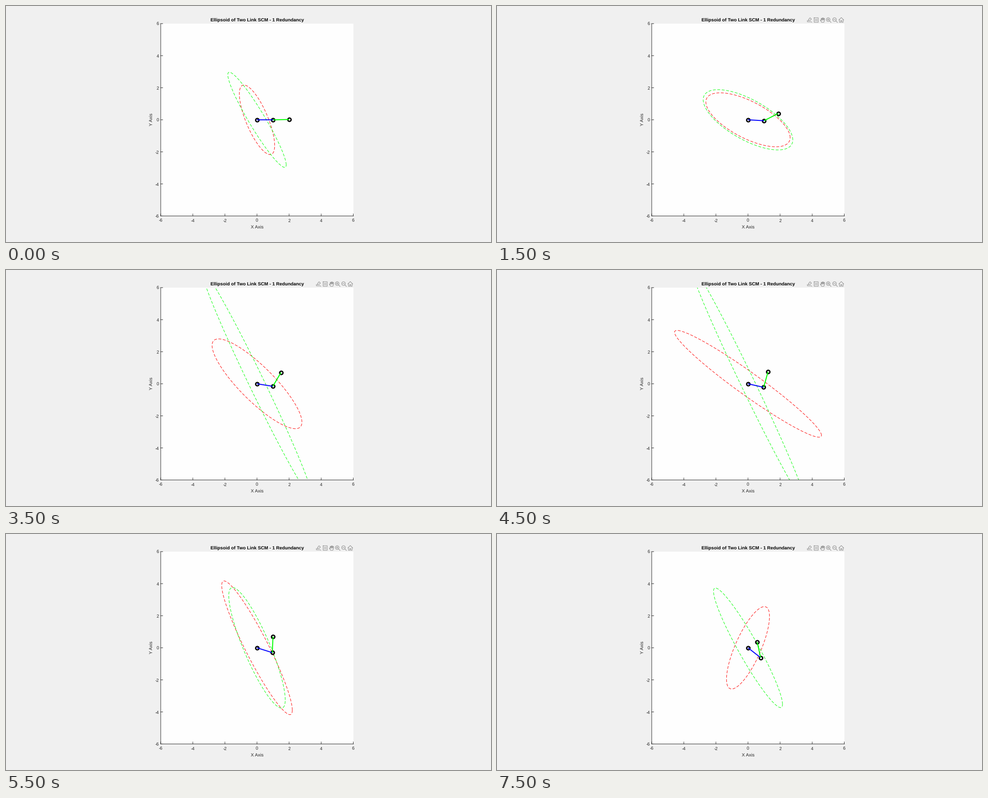
Recreate the animation shown at these times as a matplotlib script. Size 1072x522 px, loop 8 s.

```python
import numpy as np
import matplotlib
import matplotlib.pyplot as plt
from matplotlib.animation import FuncAnimation
from matplotlib.patches import Circle, Rectangle

matplotlib.rcParams["font.family"] = "Liberation Sans"
matplotlib.rcParams["text.hinting"] = "none"

W, H, DPI = 1072, 522, 100
PX = 72 / DPI                       # points per pixel
CX, CY, UNIT = 554.8, 251.7, 35.46  # plot origin and scale in pixels
LEFT, RIGHT, TOP, BOTTOM = 342, 768, 39, 464.4
INK, GREY, RED, GREEN, BLUE = "#262626", "#8c8c8c", "#ff0000", "#00ff00", "#0000ff"
FRAMES, STEP = 16, 500
TOOLBAR_FROM = 3

# Key step: (half width, half height, tilt) of the red, then the green ellipse
KEYS = {
    0: (1.10, 2.17, -.74, 1.82, 2.97, -.947),
    2: (2.93, 1.40, -.53, 3.32, 1.25, -.53),
    5: (2.02, 2.25, -.924, 1.74, 3.14, -.942),
    7: (2.80, 2.80, -.854, 3.43, 7.06, -.988),
    9: (4.58, 3.33, -.965, 3.59, 7.42, -.991),
    11: (2.20, 4.17, -.932, 1.76, 3.76, -.864),
    12: (1.2, 1.4, -.5, 1.5, 1.5, -.7),
    15: (1.34, 2.57, .76, 2.15, 3.73, -.944),
}

fig = plt.figure(figsize=(W / DPI, H / DPI), dpi=DPI, facecolor="#f0f0f0")
ax = fig.add_axes([0, 0, 1, 1])
ax.set_xlim(0, W)
ax.set_ylim(H, 0)
ax.axis("off")


def to_px(x, y):
    return CX + UNIT * np.asarray(x), CY - UNIT * np.asarray(y)


def line(xs, ys, color, width=1, **kw):
    return ax.plot(xs, ys, color=color, lw=width * PX, snap=False, **kw)[0]


def text(x, y, s, size=10.1, color=INK, ha="center", va="center_baseline", **kw):
    ax.text(x, y, s, fontsize=size * PX, color=color, ha=ha, va=va, **kw)


def draw_axes():
    ax.add_patch(Rectangle((LEFT, TOP), RIGHT - LEFT, BOTTOM - TOP, fc="#fefefe", lw=0))
    line([LEFT, LEFT, RIGHT], [TOP, BOTTOM, BOTTOM], INK, zorder=5)
    for v in range(-6, 7, 2):
        x, y = to_px(v, v)
        line([x, x], [BOTTOM - 4.5, BOTTOM], INK, zorder=5)
        line([LEFT, LEFT + 4.5], [y, y], INK, zorder=5)
        text(x, 474.5, str(v), 9.6)
        text(338.2, y + .7, str(v), 9.6, ha="right")
    text(555, 487.8, "X Axis")
    text(321, 251.2, "Y Axis", rotation=90, va="center")
    text(555, 30.7, "Ellipsoid of Two Link SCM - 1 Redundancy", 10.2,
         "black", weight="bold")


def draw_toolbar():
    parts = []

    def stroke(x, *pts):
        xs, ys = zip(*pts)
        parts.append(line(x + np.array(xs), 31 + np.array(ys), GREY))

    # export
    stroke(691, (-5, 1), (-5, 4), (3, 4), (5, 5))
    stroke(691, (-3, 1), (-1, -3), (1, -5), (4, -2), (1, 1), (-3, 1))
    # data tip
    stroke(705.5, (-4.5, -5), (4.5, -5), (4.5, 5), (-4.5, 5), (-4.5, -5))
    for y in (-1.5, 1.5):
        stroke(705.5, (-2.5, y), (2.5, y))
    # hand
    stroke(719.5, (-3, 1), (-5, 0), (-2, 5), (3, 5), (4.5, 1))
    for x in (-3, -1, 1, 3):
        stroke(719.5, (x, 0), (x, abs(x) / 2 - 5), (x + 1.5, abs(x) / 2 - 5), (x + 1.5, 0))
    # zoom in, zoom out
    for x in (733, 747):
        parts.append(ax.add_patch(Circle((x - 1, 30), 4, fill=False, ec=GREY, lw=PX)))
        stroke(x, (2, 2), (5.5, 5.5))
        stroke(x, (-3, -1), (1, -1))
    stroke(733, (-1, -3), (-1, 1))
    # home
    stroke(761, (-5.5, 0), (0, -5.5), (5.5, 0))
    stroke(761, (-4, -1), (-4, 5), (-1, 5), (-1, 1), (1, 1), (1, 5), (4, 5), (4, -1))
    return parts


draw_axes()
toolbar = draw_toolbar()

clip = Rectangle((LEFT, TOP), RIGHT - LEFT, BOTTOM - TOP, transform=ax.transData)
ovals = [line([], [], c, ls=(0, (6.3, 3.5)), dash_capstyle="butt", zorder=3)
         for c in (RED, GREEN)]
for oval in ovals:
    oval.set_clip_path(clip)
links = [line([], [], c, 2.1, zorder=4, solid_capstyle="butt") for c in (BLUE, GREEN)]
joints = line([], [], "black", ls="none", marker="o", mfc="none", ms=7.4 * PX,
              mew=2.8 * PX, zorder=3.5)

turn = np.linspace(0, 2 * np.pi, 201)
key_steps = list(KEYS)
key_shapes = np.array(list(KEYS.values()))


def shapes(i):
    """Both ellipses at a step, blended between the key steps."""
    return np.array([np.interp(i, key_steps, col) for col in key_shapes.T]).reshape(2, 3)


def ellipse(a, b, tilt):
    c, s = np.cos(turn), np.sin(turn)
    return to_px(a * c, b * (tilt * c + np.sqrt(1 - tilt ** 2) * s))


def arm(i):
    """Joint positions: the elbow folds steadily, the shoulder swings back faster."""
    shoulder = -.1 - .95 * i - .045 * i ** 2 - 13.6 * (i / 15) ** 7
    elbow = 1.3 + 9.9 * i - .042 * i ** 2
    angles = np.radians([shoulder, shoulder + elbow])
    return to_px(np.r_[0, np.cumsum(np.cos(angles))],
                 np.r_[0, np.cumsum(np.sin(angles))])


def update(i):
    for oval, shape in zip(ovals, shapes(i)):
        oval.set_data(*ellipse(*shape))
    xs, ys = arm(i)
    for k, link in enumerate(links):
        link.set_data(xs[k:k + 2], ys[k:k + 2])
    joints.set_data(xs, ys)
    for part in toolbar:
        part.set_visible(i >= TOOLBAR_FROM)
    return [*ovals, *links, joints, *toolbar]


anim = FuncAnimation(fig, update, frames=FRAMES, interval=STEP,
                     repeat=True, repeat_delay=0, blit=False)
plt.show()
```
